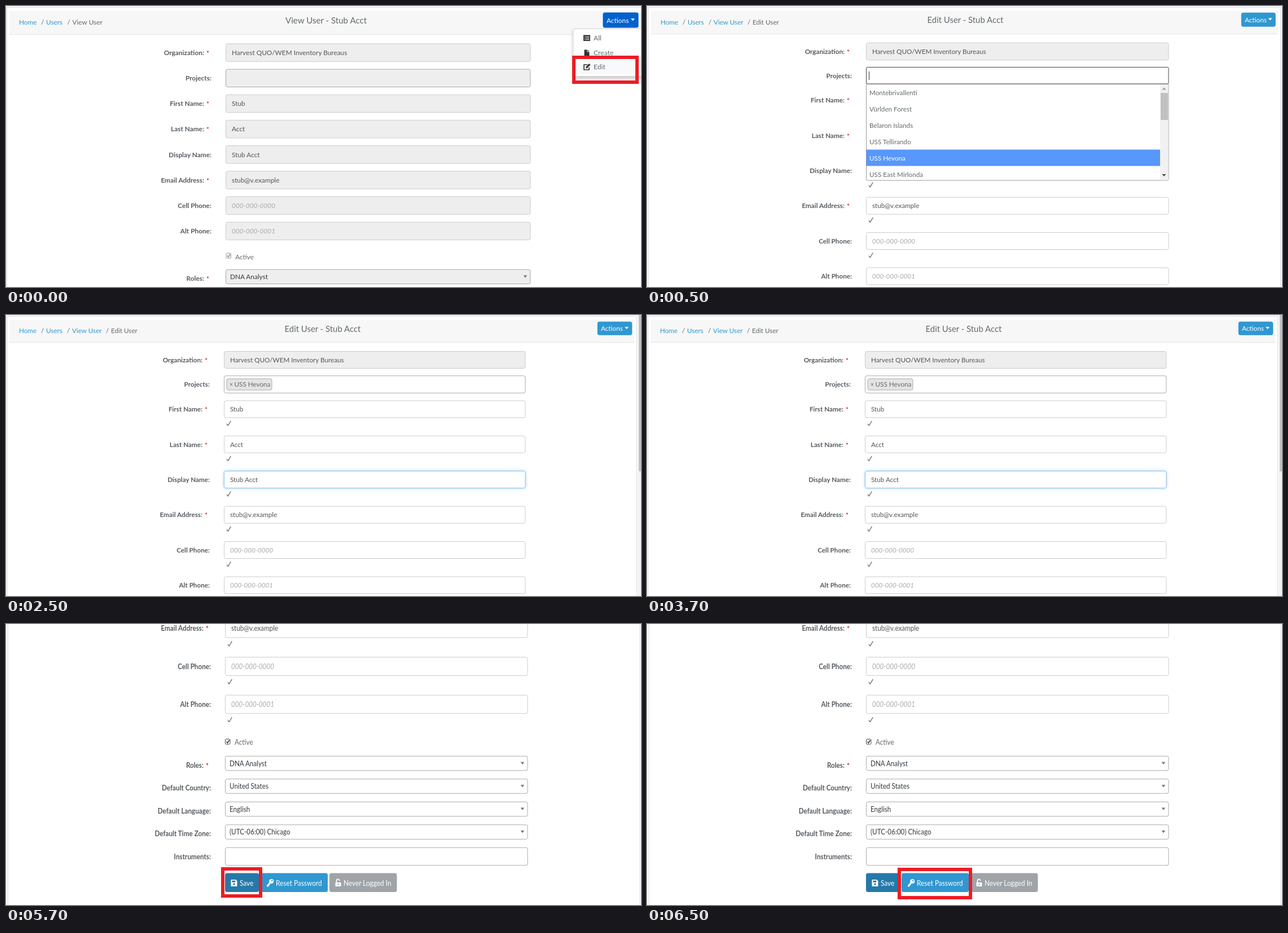
Recreate the animation shown at these times as an HTML page. Size 1125 by 498 pixels, loop 8 s.

```html
<!DOCTYPE html>
<html lang="en">
<head>
<meta charset="utf-8">
<title>Edit a user</title>
<style>
  html, body { margin: 0; width: 100%; height: 100%; overflow: hidden; background: #fff; }
  svg { display: block; width: 1125px; height: 498px; font-family: Lato, "Open Sans", sans-serif; }
  text { fill: #636b6f; white-space: pre; }
  .label { font-weight: 700; fill: #555b60; text-anchor: end; }
  .value { fill: #555; }
  .hint { fill: #aaa; font-style: italic; }
  .link { fill: #3097d1; }
  .star { fill: #e02b2b; font-weight: 700; }
  .white { fill: #fff; }
  .dark { fill: #333b41; }
  .mark { fill: none; stroke: #ed1c24; stroke-width: 6; }
  .tick { fill: none; stroke: #555; stroke-width: 1.1; }

  .scene, .cue { visibility: hidden; animation: 8s step-end infinite; }
  #view { animation-name: view; }
  #pick { animation-name: pick; }
  #picked { animation-name: picked; }
  #foot { animation-name: foot; }
  #save { animation-name: save; }
  #reset { animation-name: reset; }
  @keyframes view { 0% { visibility: visible } 6.25%, 100% { visibility: hidden } }
  @keyframes pick { 0% { visibility: hidden } 6.25% { visibility: visible } 31.25%, 100% { visibility: hidden } }
  @keyframes picked { 0% { visibility: hidden } 31.25% { visibility: visible } 56.25%, 100% { visibility: hidden } }
  @keyframes foot { 0% { visibility: hidden } 56.25%, 100% { visibility: visible } }
  @keyframes save { 0% { visibility: hidden } 56.25% { visibility: visible } 81.25%, 100% { visibility: hidden } }
  @keyframes reset { 0% { visibility: hidden } 81.25%, 100% { visibility: visible } }
</style>
</head>
<body>
<svg id="stage" viewBox="0 0 1125 498" xmlns="http://www.w3.org/2000/svg">
  <defs>
    <filter id="shadow" x="-20%" y="-20%" width="140%" height="150%">
      <feDropShadow dx="0" dy="4" stdDeviation="3" flood-opacity=".22"/>
    </filter>
    <filter id="glow" x="-5%" y="-40%" width="110%" height="180%">
      <feDropShadow dx="0" dy="0" stdDeviation="2.5" flood-color="#66afe9" flood-opacity=".6"/>
    </filter>
  </defs>
</svg>
<script>
const ORG = 'Harvest QUO/WEM Inventory Bureaus';
const FIRST = 'Stub', LAST = 'Acct', FULL = FIRST + ' ' + LAST;
const MAIL = 'stub@v.example';
const CELL = '000-000-0000', ALT = '000-000-0001';
const SHIP = 'USS Hevona';

let size = 11.7;   // body text size of the current scene
let tall = 1;      // vertical scale of the current scene

// Text centred vertically on y
const text = (x, y, s, cls = '', fs = size) =>
  `<text class="${cls}" font-size="${fs}" transform="translate(${x} ${y + fs * .36 * tall}) scale(1 ${tall})">${s}</text>`;

const rect = (x, y, r, b, fill, stroke = 'none', rx = 0, more = '') =>
  `<rect x="${x}" y="${y}" width="${r - x}" height="${b - y}" fill="${fill}" stroke="${stroke}" rx="${rx}" ${more}/>`;

const line = (x1, y1, x2, y2, c = '#dcdfe2') =>
  `<path d="M${x1} ${y1}L${x2} ${y2}" stroke="${c}"/>`;

const caret = (x, y, c, w = 3.5, h = 4) =>
  `<path d="M${x - w} ${y - h / 2}h${2 * w}l${-w} ${h}z" fill="${c}"/>`;

const tick = (x, y) =>
  `<path class="tick" d="M${x} ${y + 1}l2.3 3.2l5 -8.4"/>`;

const label = (right, y, s, star) => star
  ? text(right - 13, y, s + ':', 'label') + text(right - 9, y + 1, '*', 'star')
  : text(right, y, s + ':', 'label');

const field = (x, r, y, h, s = '', cls = 'value', fill = '#fff', stroke = '#ccc', more = '') =>
  rect(x, y - h / 2, r, y + h / 2, fill, stroke, 3, more) + (s ? text(x + 10.5, y, s, cls) : '');

const select = (x, r, y, s, fill) =>
  rect(x, y - 13, r, y + 12.5, fill, '#aaa', 3) + text(x + 7.5, y, s, 'dark') + caret(r - 9, y - .5, '#777', 3.2, 4.5);

const checkbox = (x, y, c, bg) =>
  rect(x, y - 4.5, x + 8.5, y + 4.5, bg, c, 1.5) +
  `<path d="M${x + 2} ${y}l2 2.2l3.2 -5" fill="none" stroke="${c}" stroke-width="1.7"/>`;

const panel = (left, right) =>
  rect(0, 0, 1125, 498, '#f8f9fa') + rect(left, 2.5, right, 510, '#fff', '#dcdfe2');

// Grey title bar with breadcrumbs
function header(x, right, bottom, crumbs, y, title, titleX, titleY, fs) {
  let out = rect(x, 8.5, right, bottom, '#f7f7f7') + line(x, bottom, right, bottom, '#e3e5e7');
  crumbs.forEach(([cx, s], i) => {
    if (i) out += text(cx - 9, y, '/');
    out += text(cx, y, s, i < crumbs.length - 1 ? 'link' : '');
  });
  return out + text(titleX, titleY, title, '', fs);
}

const actions = (x, y, w, h, fill, stroke) =>
  rect(x, y, x + w, y + h, fill, stroke, 3, 'stroke-width="1.5"') +
  text(x + 5.5, y + h / 2 + .5, 'Actions', 'white') + caret(x + w - 9, y + h / 2 - .8, '#fff');

const mark = (x, y, r, b) =>
  `<rect class="mark" x="${x + 3}" y="${y + 3}" width="${r - x - 6}" height="${b - y - 6}"/>`;

const icons = {
  list: '<path d="M0 0h12v10.500h-12z" fill="#333"/><path d="M2 3h1.500M4.500 3h6M2 5.500h1.500M4.500 5.500h6M2 8h1.500M4.500 8h6" stroke="#fff" stroke-width="1.200"/>',
  file: '<path d="M0 0h5v4h4v8h-9zM6 0l3 3h-3z" fill="#333"/>',
  edit: '<path d="M7.500 2h-6.500v9h9v-4" fill="none" stroke="#333" stroke-width="1.700"/><path d="M4 8.500l.5 -2.700l5.800 -5.800l2.300 2.300l-5.800 5.800z" fill="#333"/>',
  disk: '<path d="M1 0h7.500l2.500 2.700v8.300q0 1 -1 1h-9q-1 0 -1 -1v-10q0 -1 1 -1z" fill="#fff"/><path d="M1.800 1.700h6v3h-6z" fill="#2579a9"/><circle cx="5.500" cy="8" r="1.700" fill="#2579a9"/>',
  key: '<circle cx="8.200" cy="4" r="4" fill="#fff"/><path d="M5.500 5l-5.500 6v2.500h3.300v-2h1.700v-1.800l3 -2.700z" fill="#fff"/><circle cx="9.300" cy="3" r="1.200" fill="#3097d1"/>',
  lock: '<path d="M0 6h10v7h-10z" fill="#fff"/><path d="M2 7v-3.500a2.700 2.900 0 0 1 5.400 -.3" fill="none" stroke="#fff" stroke-width="1.700"/><circle cx="5" cy="9.300" r="1.200" fill="#9fa4a9"/>'
};
const icon = (x, y, name) => `<g transform="translate(${x} ${y})">${icons[name]}</g>`;

function viewScene() {
  size = 11.85; tall = 1;
  const x = 389.5, r = 929, grey = '#eee';
  let out = panel(1.5, 1130) +
    header(6, 1125, 50.5, [[23, 'Home'], [71, 'Users'], [117.5, 'View User']], 29,
      'View User - ' + FULL, 495, 25.5, 15.1);
  const rows = [
    ['Organization', 1, ORG], ['Projects', 0, ''], ['First Name', 1, FIRST], ['Last Name', 1, LAST],
    ['Display Name', 0, FULL], ['Email Address', 1, MAIL], ['Cell Phone', 0, CELL], ['Alt Phone', 0, ALT]
  ];
  rows.forEach(([name, star, s], i) => {
    const y = 82.6 + i * 45.17;
    out += label(364, y, name, star) +
      field(x, r, y, 31.5, s, i > 5 ? 'hint' : 'value', grey, i === 1 ? '#aaa' : '#ccc');
  });
  out += checkbox(390, 442.5, '#999', '#f4f4f4') + text(406, 444.5, 'Active') +
    label(364, 483, 'Roles', 1) + select(x, r, 480, 'DNA Analyst', grey);

  out += rect(1005, 40.5, 1132, 124.5, '#fff', '#d5d5d5', 3, 'filter="url(#shadow)"') +
    rect(1006, 96, 1125, 121, '#f8f9fa');
  [['All', 'list', 57], ['Create', 'file', 83], ['Edit', 'edit', 107.5]].forEach(([s, name, y]) => {
    out += icon(name === 'file' ? 1024.5 : 1023, y - 5.5, name) + text(1041, y, s, '', 12.2);
  });
  return out + rect(1057, 11, 1121, 39, '#8fc0f7', 'none', 4) +
    actions(1058.5, 12.5, 61, 25, '#0062cc', '#005cbf') + mark(1003, 88, 1121, 138);
}

const trail = x => [[x, 'Home'], [x + 48, 'Users'], [x + 94, 'View User'], [x + 163, 'Edit User']];

// Rows below the project list, shared by both edit scenes
function editRows(x, r, right, from) {
  const rows = [
    ['First Name', 1, FIRST], ['Last Name', 1, LAST], ['Display Name', 0, FULL],
    ['Email Address', 1, MAIL], ['Cell Phone', 0, CELL], ['Alt Phone', 0, ALT]
  ];
  return rows.map(([name, star, s], i) => {
    const y = 166.9 + i * 62.4;
    const focus = i === 2;
    let out = label(right, y, name, star);
    if (i >= from) {
      out += field(x, r, y, 30, s, i > 3 ? 'hint' : 'value', '#fff',
        focus ? '#8cc4ea' : '#ccc', focus ? 'filter="url(#glow)"' : '');
    }
    if (i >= from - 1) out += tick(x + 4.5, y + 25);
    return out;
  }).join('');
}

function pickScene() {
  size = 11.7; tall = 1;
  const x = 388.5, r = 924, right = 363;
  let out = panel(2.5, 1122.5) +
    header(7, 1118, 49.5, trail(24), 28.5, 'Edit User - ' + FULL, 496.5, 25, 14.9) +
    actions(1053.5, 12.5, 59.5, 23.5, '#3097d1', '#3097d1') +
    label(right, 80.5, 'Organization', 1) + field(x, r, 80.5, 30.5, ORG, 'value', '#eee') +
    label(right, 123.5, 'Projects') + editRows(x, r, right, 3) +
    rect(x, 138, r, 309, '#fff', '#999', 2) +
    rect(x, 108.5, r, 138, '#fff', '#444', 2) + line(393.5, 116, 393.5, 131, '#333');

  out += rect(388.5, 254.5, 909, 283.5, '#5897fb');
  ['Montebrivallenti', 'Vürlden Forest', 'Belaron Islands', 'USS Tellirando', SHIP, 'USS East Mirlonda']
    .forEach((s, i) => { out += text(394, 153.3 + i * 29, s, s === SHIP ? 'white' : ''); });

  return out + rect(909, 139, 923.5, 308.5, '#f1f1f1') + rect(910, 154, 923, 202, '#c1c1c1') +
    caret(916, 146.5, '#a3a3a3', 3.8, -4) + caret(916, 300, '#505050', 3.8, 4);
}

function pickedScene() {
  size = 11.7; tall = 1;
  const x = 386.5, r = 920, right = 361;
  return panel(2, 1117.5) +
    header(6, 1113, 48.5, trail(23), 28, 'Edit User - ' + FULL, 493.5, 24.5, 14.9) +
    actions(1048.5, 12.5, 60, 22.5, '#3097d1', '#3097d1') +
    rect(1120, 0, 1125, 498, '#f1f1f1') + rect(1121, 0, 1125, 277, '#c1c1c1') +
    label(right, 79.5, 'Organization', 1) + field(x, r, 79.5, 30, ORG, 'value', '#eee') +
    label(right, 123, 'Projects') + field(x, r, 123, 30.5, '', '', '#fff', '#aaa') +
    rect(391, 113, 471, 133, '#e4e4e4', '#aaa', 3) +
    text(396, 123, '×', '', 10.5) + text(404.5, 122.7, SHIP) +
    editRows(x, r, right, 0);
}

function footScene() {
  size = 11.7; tall = 1.08;
  const x = 388.5, r = 924, right = 363;
  let out = rect(0, 0, 1125, 498, '#f8f9fa') + rect(3.5, -5, 1123, 510, '#fff', '#dcdfe2');

  [['Email Address', 1, MAIL], ['Cell Phone', 0, CELL], ['Alt Phone', 0, ALT]].forEach(([name, star, s], i) => {
    const y = 7.8 + i * 67.3;
    out += label(right, y, name, star) + field(x, r, y, 32.5, s, i ? 'hint' : 'value') + tick(x + 4.5, y + 27);
  });
  out += checkbox(388.5, 208.5, '#444', '#fff') + text(405, 209.5, 'Active');

  [['Roles', 'DNA Analyst'], ['Default Country', 'United States'],
   ['Default Language', 'English'], ['Default Time Zone', '(UTC-06:00) Chicago']].forEach(([name, s], i) => {
    const y = 247.2 + i * 40.55;
    out += label(right, y + 3, name, i === 0) + select(x, r, y, s, '#fff');
  });
  out += label(right, 412.5, 'Instruments') + field(x, r, 412, 31.5, '', '', '#fff', '#aaa');

  [[388, 448, '#2579a9', 'disk', 398.5, 453, 'Save', 414],
   [451, 570, '#3097d1', 'key', 462, 452, 'Reset Password', 478],
   [573, 692.5, '#9fa4a9', 'lock', 583.5, 452, 'Never Logged In', 598]].forEach(([a, b, c, name, ix, iy, s, tx]) => {
    out += rect(a, 441.5, b, 475, c, 'none', 3.5) + icon(ix, iy, name) + text(tx, 459, s, 'white', 11.85);
  });
  return out + `<g id="save" class="cue">${mark(381, 431, 454, 485)}</g>` +
    `<g id="reset" class="cue">${mark(444, 432, 576, 488)}</g>`;
}

const scenes = { view: viewScene, pick: pickScene, picked: pickedScene, foot: footScene };
document.getElementById('stage').innerHTML += Object.entries(scenes)
  .map(([id, draw]) => `<g id="${id}" class="scene">${draw()}</g>`).join('');
</script>
</body>
</html>
```
